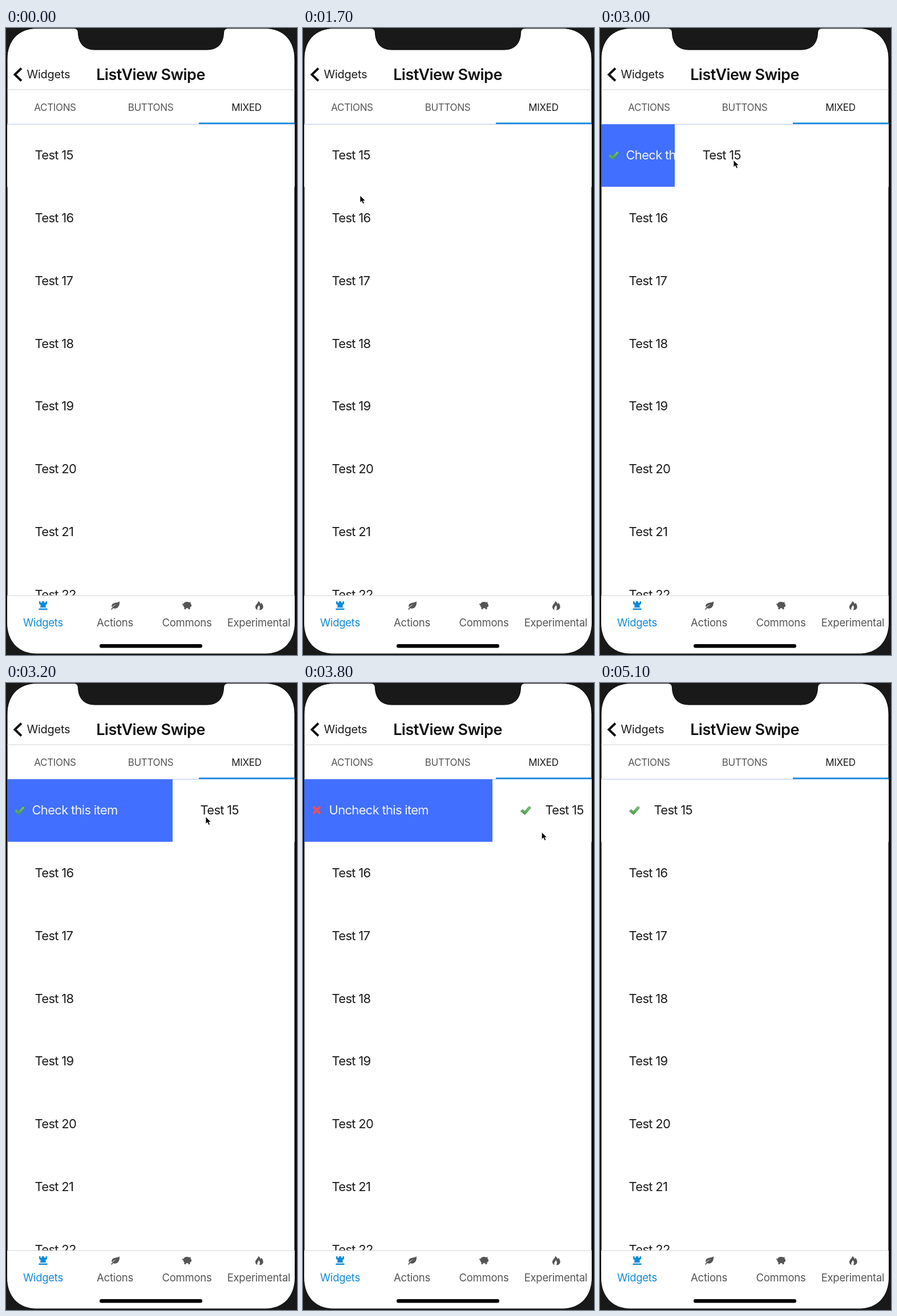
Animation, 510 px wide and 1097 px high, one loop 5600 ms. Source, as an HTML page:

```html
<!DOCTYPE html>
<html lang="en">
<head>
<meta charset="utf-8">
<title>ListView Swipe</title>
<style>
  html, body { margin: 0; width: 100%; height: 100%; overflow: hidden; background: #191919; }
  svg { display: block; width: 100%; height: 100%; }
  text { font-family: Inter, "Open Sans", sans-serif; fill: #1b1b1b; }
  .row { font-size: 22px; letter-spacing: -.7px; }
  .back { font-size: 20px; letter-spacing: -.25px; }
  .title { font-size: 27px; font-weight: 600; letter-spacing: -.55px; fill: #111; }
  .tab { font-size: 17px; letter-spacing: -.35px; }
  .nav { font-size: 18.5px; letter-spacing: -.27px; }
  .tab, .nav, .title { text-anchor: middle; }
  .muted { fill: #555; }
  .active { fill: #0f8ad9; }
  .line { stroke: #d2d2d2; stroke-width: 1.2; }
</style>
</head>
<body>
<svg viewBox="0 0 510 1097" preserveAspectRatio="none">
  <defs>
    <path id="screen" d="M54 .5H119Q126 .5 126.5 8C127 27 137 38 156 38H352C371 38 381 27 381.5 8Q382 .5 389 .5H454C486 .5 506 22 506 54V1040C506 1073 486 1094.500 454 1094.500H54C22 1094.500 2 1073 2 1040V54C2 22 22 .5 54 .5Z"/>
    <clipPath id="inside"><use href="#screen"/></clipPath>
    <linearGradient id="green" x2="0" y2="1">
      <stop stop-color="#82c878"/>
      <stop offset="1" stop-color="#43984a"/>
    </linearGradient>
    <path id="check" d="M.8 9.200L4.300 6.200 8 9.600 15.800.8 19 3.300 8.400 15.500Z"
      fill="url(#green)" stroke="#4d9b50" stroke-width=".9" stroke-linejoin="round"/>
  </defs>

  <rect width="510" height="1097" fill="#191919"/>
  <path d="M1 50V1045M507.500 50V1045" stroke="#000" stroke-width="3"/>
  <use href="#screen" fill="#fff" stroke="#000"/>

  <g clip-path="url(#inside)">
    <path d="M27 70.500L15.500 81.500 27 92.500" fill="none" stroke="#111" stroke-width="4"/>
    <text class="back" x="36.500" y="88">Widgets</text>
    <text class="title" x="253.500" y="91">ListView Swipe</text>
    <path class="line" d="M2 108H506"/>
    <text class="tab muted" x="86" y="144.500">ACTIONS</text>
    <text class="tab muted" x="253.500" y="144.500">BUTTONS</text>
    <text class="tab" x="421.500" y="144.500">MIXED</text>
    <path d="M2 168H338" stroke="#eee"/>
    <rect class="active" x="338" y="165.500" width="168" height="2.700"/>

    <rect x="2" y="168.300" width="504" height="109.500" fill="#416fff"/>
    <use id="checkIcon" href="#check" x="14" y="215"/>
    <path id="crossIcon" d="M18 216.500L30 228.500M30 216.500L18 228.500" stroke="#ea5160" stroke-width="4.500"/>
    <text id="action" class="row" x="45.500" y="230" style="fill:#f1f4ff"></text>

    <g id="slider">
      <rect x="2" y="168.500" width="504" height="109.500" fill="#fff"/>
      <use id="doneIcon" href="#check" x="50.500" y="215"/>
      <text id="item" class="row" y="230">Test 15</text>
    </g>
    <g id="rows"></g>

    <rect x="2" y="993" width="504" height="104" fill="#fff"/>
    <path class="line" d="M2 993H506"/>
    <g id="nav"></g>
    <path class="active" d="M58 1003H60.500V1005.500H63V1003H67V1005.500H69.500V1003H72V1007.500L69.500 1009.500V1012.500L70.500 1014H59.500L60.500 1012.500V1009.500L58 1007.500ZM57.500 1015.500H72.500V1018H57.500Z"/>
    <path class="muted" d="M199 1003C197 1006 189 1004.500 186 1008.500Q184.500 1011 185.500 1013.500Q189 1009.500 194 1008.500Q187 1011.500 184 1017L185.500 1018 187.500 1015C193 1017.500 200 1013.500 199 1003Z"/>
    <path class="muted" d="M312 1006C314 1003.500 319 1003.500 321 1005L323.500 1004V1007L325 1009V1012L322.500 1013.500V1017H319.500V1015H315.500V1017H312.500V1013.500Q310.500 1012 310.500 1010L309 1008.500V1006.500L310.500 1008Z"/>
    <path class="muted" d="M442 1002.500C443 1006 437 1008.500 437 1013Q437 1017 441 1018.200C438.500 1014 443.500 1012 443 1009.500Q446.500 1013.500 443.800 1018.300C449 1018.500 451 1015 450.800 1012Q450.500 1008 447.500 1005.500L446 1008.500Q446 1005 442 1002.500Z"/>
    <rect x="164" y="1078" width="180" height="6.500" rx="3.200"/>
  </g>

  <path id="cursor" d="M0 0V12.500L3 9.800 5 14.500 7.500 13.500 5.500 9.200H9.300Z" stroke="#fff" stroke-width=".8"/>
</svg>

<script>
const LOOP = 5600, STEP = 100, ROW_PITCH = 109.85;
const SWAP_TIME = 3800, CURSOR_IN = 700, CURSOR_OUT = 5100;

// Each key is [time, ...values].
const pointerKeys = [
  [700, 503, 990], [800, 488, 962], [900, 475, 947], [1000, 470, 942], [1200, 470, 942],
  [1300, 455, 920], [1500, 270, 600], [1600, 160, 400], [1700, 100, 293], [1800, 87, 244],
  [2100, 79, 228], [2500, 79, 228], [2600, 90, 227], [2700, 105, 228], [3000, 234, 231],
  [3100, 306, 233], [3200, 350, 234], [3400, 385, 235], [3700, 400, 242],
  [4000, 455, 299], [4300, 482, 335], [4500, 491, 346], [4800, 491, 346], [5000, 502, 335]
];
const swipeKeys = [
  [2600, 0], [2700, 5], [3000, 129], [3100, 155], [3200, 290], [3300, 410],
  [3400, 478.5], [3500, 504], [3700, 504], [3800, 330], [3900, 115], [4000, 27.5],
  [4100, 8], [4200, 2], [4300, 0]
];

const $ = id => document.getElementById(id);

function sample(keys, time) {
  const next = keys.findIndex(key => key[0] > time);
  if (next === 0) return keys[0].slice(1);
  if (next < 0) return keys[keys.length - 1].slice(1);
  const a = keys[next - 1], b = keys[next];
  const part = (time - a[0]) / (b[0] - a[0]);
  return a.slice(1).map((value, i) => value + (b[i + 1] - value) * part);
}

function addText(parent, className, x, y, content) {
  const node = document.createElementNS(parent.namespaceURI, "text");
  node.setAttribute("class", className);
  node.setAttribute("x", x);
  node.setAttribute("y", y);
  node.textContent = content;
  parent.append(node);
}

function show(id, visible) {
  $(id).style.display = visible ? "" : "none";
}

for (let i = 1; i < 8; i++) {
  addText($("rows"), "row", 50.5, 230 + i * ROW_PITCH, `Test ${15 + i}`);
}
["Widgets", "Actions", "Commons", "Experimental"].forEach((label, i) =>
  addText($("nav"), `nav ${i ? "muted" : "active"}`, 65 + i * 126, 1046.5, label));

function draw(now) {
  const time = Math.floor((now % LOOP) / STEP) * STEP;
  const checked = time >= SWAP_TIME;
  const [swipe] = sample(swipeKeys, time);
  const [x, y] = sample(pointerKeys, time);

  show("checkIcon", !checked);
  show("crossIcon", checked);
  show("doneIcon", checked);
  show("cursor", time >= CURSOR_IN && time < CURSOR_OUT);
  $("action").textContent = checked ? "Uncheck this item" : "Check this item";
  $("item").setAttribute("x", checked ? 94.5 : 50.5);
  $("slider").setAttribute("transform", `translate(${swipe})`);
  $("cursor").setAttribute("transform", `translate(${x} ${y})`);
}

const start = performance.now();
function tick() {
  draw(performance.now() - start);
  requestAnimationFrame(tick);
}
tick();
</script>
</body>
</html>
```
